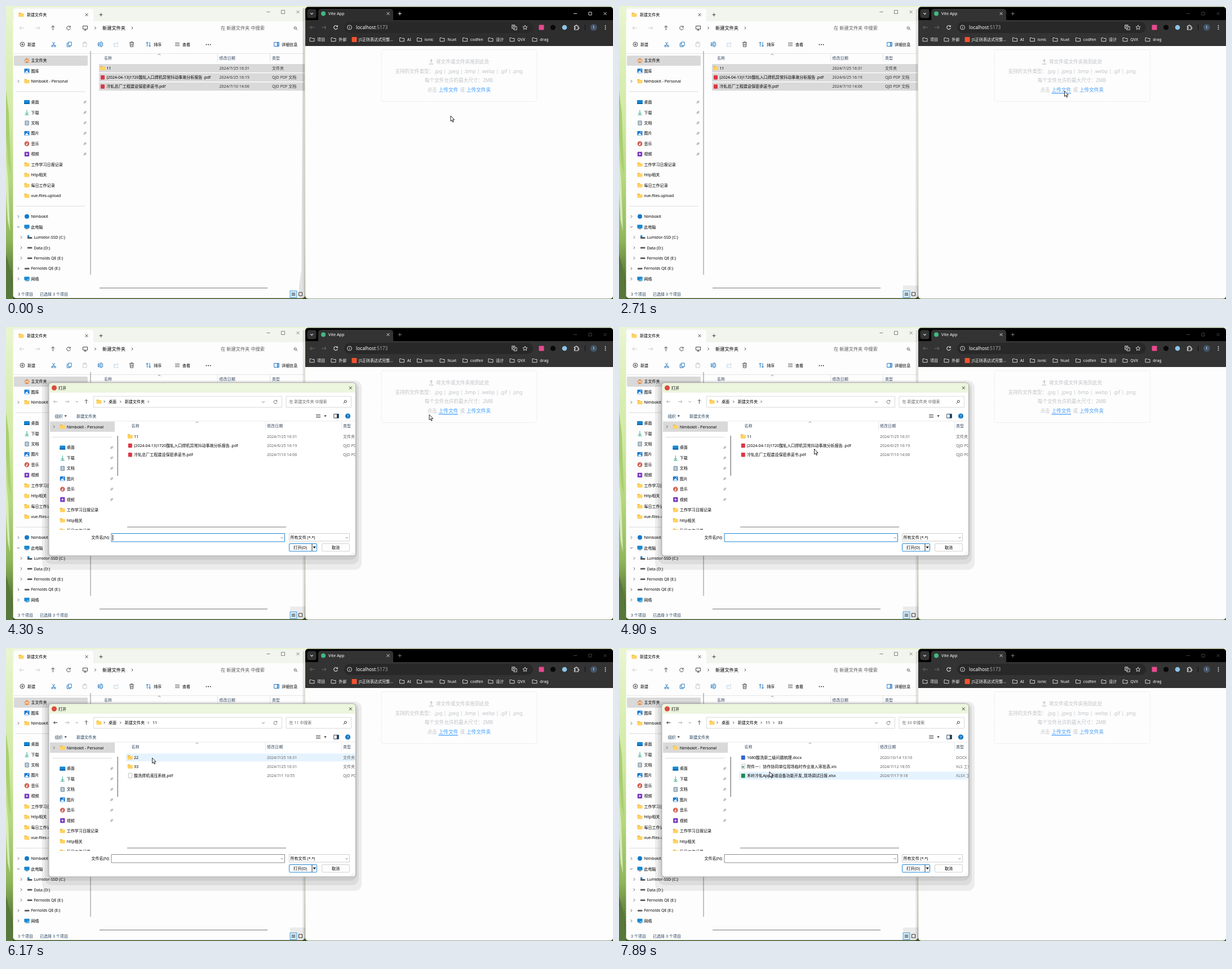
Animation, 1077 px wide and 520 px high, one loop 8 s. Source, as an HTML page with a canvas:

```html
<!DOCTYPE html>
<html lang="zh-CN">
<head>
<meta charset="utf-8">
<title>Upload demo</title>
<style>
html, body { margin: 0; width: 100%; height: 100%; overflow: hidden; background: #fff; }
canvas { display: block; }
</style>
</head>
<body>
<canvas id="stage" width="1077" height="520"></canvas>
<script>
const c = document.getElementById('stage').getContext('2d');
const LOOP = 8000;
const FONT = '"Noto Sans", "Noto Sans CJK SC", "Noto Sans CJK", sans-serif';
const INK = '#000', BLUE = '#0f6cbd', DIM = '#c6c6c6', HEAD = '#3b4c64';

const ring = 'M3.9 0A3.9 3.9 0 1 1-3.9 0 3.9 3.9 0 1 1 3.9 0';
const icons = {
  left: 'M4 0H-4M-1-3L-4 0-1 3', right: 'M-4 0H4M1-3L4 0 1 3', up: 'M0 4V-4M-3-1L0-4 3-1',
  reload: 'M2.8-1.8A3.3 3.3 0 1 0 3.3 .5M3.2-3.8V-1.5H1',
  chevR: 'M-1.2-2.3L1.1 0-1.2 2.3', chevD: 'M-2.3-1.1L0 1.2 2.3-1.1', chevU: 'M-2.3 1L0-1 2.3 1',
  close: 'M-2.5-2.5L2.5 2.5M2.5-2.5L-2.5 2.5', min: 'M-3 0H3', max: 'M-3-3H3V3H-3Z', plus: 'M-3 0H3M0-3V3',
  search: 'M1.2-.6A2 2 0 1 1-2.8-.6 2 2 0 1 1 1.2-.6M.7 .9L3 3',
  screen: 'M-4-3.5H4V2H-4ZM0 2V4M-2 4H2',
  add: ring + 'M-2 0H2M0-2V2', info: ring + 'M0-.4V2M0-2V-1.3',
  cut: 'M-2-4L1.5 2M2-4L-1.5 2M-1 3A1.4 1.4 0 1 1-3.8 3 1.4 1.4 0 1 1-1 3M3.8 3A1.4 1.4 0 1 1 1 3 1.4 1.4 0 1 1 3.8 3',
  copy: 'M-1.5-4H3.8V2.5H-1.5ZM-1.5-2H-4V4.2H1.5V2.5',
  paste: 'M-3.5-3H3V4H-3.5ZM-1.5-4.2H1V-2H-1.5Z',
  rename: 'M0-2.8H-4V2.8H0M2.5-2.8H4V2.8H2.5M1.2-4.2V4.2M0-4.2H2.4M0 4.2H2.4M-2.8 1.6L-1.7-1.4-.6 1.6',
  share: 'M-1-2H-4V4H3V1M-2 1C-2-1 0-2 3-2M1.5-4L3.8-2 1.5 0',
  trash: 'M-4-3H4M-1.5-3V-4.3H1.5V-3M-3-3L-2.4 4.3H2.4L3-3M-1-1V2.5M1-1V2.5',
  sort: 'M-2-4V4M-4-2L-2-4 0-2M2.5-4V4M.5 2L2.5 4 4.5 2',
  lines: 'M-4-2.5H4M-4 0H4M-4 2.5H4',
  panel: 'M-4.3-3.5H4.3V3.5H-4.3ZM1.3-3.5V3.5M2.8-3.5V3.5',
  upload: 'M0 2V-4M-2.6-1.5L0-4 2.6-1.5M-4 4H4',
  folder: 'M-4-3H-1L0-2H4V3.2H-4Z',
  pin: 'M1-3L3-1 1.3 0 .3 2-2-.3 0-1.3ZM-.8 .8L-3 3',
  translate: 'M-4.5-4.5H1V2H-4.5ZM1.5-1.5H4.5V4.5H-1V2M-3.3-2.4H-.3M-1.8-3.4V-2.4M-.8-2.4L-3 .8',
  star: 'M0-4L1.2-1.3 4-1.1 1.9 .8 2.5 3.6 0 2.1-2.5 3.6-1.9 .8-4-1.1-1.2-1.3Z',
  puzzle: 'M-3.5-2.5H-1.2A1.3 1.3 0 1 1 1.2-2.5H3V0A1.2 1.2 0 1 1 3 2V4H-3.5V1.8A1.2 1.2 0 1 0-3.5-.3Z'
};
for (const k in icons) icons[k] = new Path2D(icons[k]);
const arrowPath = new Path2D('M0 0V9.6L2.2 7.5 3.7 11 5.2 10.4 3.7 6.9H6.7Z');
const handPath = new Path2D('M-1 .8Q0-.5 1 .8V4.8L4.4 5.8Q6 6.3 5.7 8L4.7 12.8H-1.6L-4.3 8.4Q-4 6.6-2.6 7.4L-1 8.6Z');

function icon(name, x, y, color = INK, w = 0.9, s = 1) {
  c.save();
  c.translate(x, y);
  c.scale(s, s);
  c.strokeStyle = color;
  c.lineWidth = w / Math.abs(s);
  c.stroke(icons[name]);
  c.restore();
}
function box(x, y, w, h, fill, r = 0, stroke, lw = 1) {
  c.beginPath();
  c.roundRect(x, y, w, h, r);
  if (fill) { c.fillStyle = fill; c.fill(); }
  if (stroke) { c.strokeStyle = stroke; c.lineWidth = lw; c.stroke(); }
}
function dot(x, y, r, fill) {
  c.beginPath();
  c.arc(x, y, r, 0, 7);
  c.fillStyle = fill;
  c.fill();
}
function poly(fill, ...p) {
  c.beginPath();
  for (let i = 0; i < p.length; i += 2) c.lineTo(p[i], p[i + 1]);
  c.fillStyle = fill;
  c.fill();
}
// y is the optical middle of the line
function text(s, x, y, color = INK, size = 7.05, align = 'left') {
  c.font = size + 'px ' + FONT;
  c.textAlign = align;
  c.fillStyle = color;
  c.fillText(s, x, y + size * 0.36);
}
function clipTo(x, y, w, h, draw) {
  c.save();
  c.beginPath();
  c.rect(x, y, w, h);
  c.clip();
  draw();
  c.restore();
}
function folder(x, y) {
  box(x - 4.5, y - 3.6, 4.5, 3, '#e9a920', 0.8);
  box(x - 4.5, y - 2.5, 9, 6.2, '#ffd261', 0.8);
}
function page(x, y) {
  box(x - 3, y - 4.2, 6.2, 8.4, '#fff', 0.5, '#a5a5a5', 0.7);
}

const glyph = {
  folder,
  page,
  pdf: (x, y) => box(x - 3.5, y - 3.5, 7, 7.5, '#dc3545', 1),
  doc: (x, y) => box(x - 3.5, y - 3.5, 7, 7.5, '#3565d0', 1),
  xls: (x, y) => box(x - 3.5, y - 3.5, 7, 7.5, '#1f8a50', 1),
  sheet(x, y) { page(x, y); box(x - 2, y - 1, 3.5, 3.5, '#57a878'); },
  home(x, y) {
    poly('#e8833a', x - 5, y, x, y - 4.5, x + 5, y, x + 3.4, y, x + 3.4, y + 4, x - 3.4, y + 4, x - 3.4, y);
    box(x - 2.3, y - 1, 4.6, 4, '#fff2e4');
    box(x - 0.9, y + 0.5, 1.8, 3.5, '#c96a24');
  },
  pic(x, y) {
    box(x - 4.5, y - 4, 9, 8, '#1878cf', 1);
    poly('#e9f5ff', x - 4, y + 3.5, x - 0.3, y - 1, x + 4, y + 3.5);
    dot(x + 2, y - 1.8, 0.9, '#fff');
  },
  cloud: (x, y) => dot(x, y, 4, '#1479c9'),
  desk(x, y) {
    box(x - 5, y - 3.5, 10, 7, '#1687d0', 1);
    box(x - 5, y + 1.8, 10, 1.7, '#0a5ca6', 0.5);
  },
  down(x, y) {
    icon('up', x, y - 0.6, '#2fa58d', 1, -0.9);
    box(x - 3.5, y + 3.6, 7, 1, '#2fa58d');
  },
  text(x, y) {
    box(x - 3.6, y - 4, 7.4, 8.4, '#7f98ab', 0.8);
    for (let i = 0; i < 3; i++) box(x - 2.2, y - 2.3 + i * 2, 4.6, 1, '#fff');
  },
  music(x, y) {
    dot(x, y, 4.3, '#d0604f');
    box(x, y - 2.4, 0.9, 4, '#fff');
    dot(x - 0.4, y + 1.4, 1.2, '#fff');
  },
  video(x, y) {
    box(x - 4.2, y - 4.2, 8.4, 8.4, '#7b3cc0', 1);
    poly('#fff', x - 1.2, y - 2, x + 2.2, y, x - 1.2, y + 2);
  },
  pc(x, y) {
    box(x - 4.6, y - 3.8, 9.2, 6.2, '#1687d0', 0.8);
    box(x - 2.5, y + 3, 5, 1, '#4a6274');
  },
  disk: (x, y) => box(x - 4, y - 1.2, 8.4, 2.8, '#555a5e', 0.6),
  sysdisk(x, y) {
    box(x - 4, y - 3.6, 3.4, 3.2, '#1e8ad6');
    glyph.disk(x, y + 0.8);
  },
  net(x, y) {
    glyph.pc(x, y);
    dot(x + 2.4, y + 2, 2.3, '#4fb5e6');
  }
};

// label, glyph, arrow, x shift
const quick = [
  ['桌面', 'desk'], ['下载', 'down'], ['文档', 'text'], ['图片', 'pic'], ['音乐', 'music'], ['视频', 'video'],
  ['工作学习日报记录', 'folder'], ['http相关', 'folder'], ['每日工作记录', 'folder'], ['vue-files-upload', 'folder']
];
const tree = [
  ['主文件夹', 'home'], ['图库', 'pic'], ['Nimbokit - Personal', 'folder', 'chevR'], null,
  ...quick, null,
  ['Nimbokit', 'cloud', 'chevR'], ['此电脑', 'pc', 'chevD'], ['Lumidor-SSD (C:)', 'sysdisk', 'chevR', 5],
  ['Data (D:)', 'disk', 'chevR', 5], ['Fernolds QE (E:)', 'disk', 'chevR', 5],
  ['Fernolds QE (E:)', 'disk', 'chevR'], ['网络', 'net', 'chevR']
];
const dialogTree = [['Nimbokit - Personal', 'folder', 'chevR'], null, ...quick];

function drawTree(list, x, y0, lineX, lineW, pinX) {
  list.forEach((row, i) => {
    const y = y0 + i * 18.46;
    if (!row) return box(lineX, y - 0.5, lineW, 1, '#dcdcdc');
    const [label, kind, arrow, dx = 0] = row;
    if (arrow) icon(arrow, x - 15 + dx, y, '#555', 0.9);
    glyph[kind](x + dx, y);
    text(label, x + 7.4 + dx, y);
    const k = quick.indexOf(row);
    if (k >= 0 && k < 6) icon('pin', pinX, y, '#858585', 0.9, 0.8);
  });
}

const PDF = 'QJD PDF 文档', DIR = '文件夹';
const folders = {
  root: [
    ['11', '2024/7/25 16:31', DIR, 'folder'],
    ['(2024-04-13)1720酸轧入口焊机异常抖动事故分析报告 .pdf', '2024/6/25 16:19', PDF, 'pdf'],
    ['冷轧总厂工程建设保密承诺书.pdf', '2024/7/10 14:06', PDF, 'pdf']
  ],
  11: [
    ['22', '2024/7/25 16:31', DIR, 'folder'],
    ['33', '2024/7/25 16:31', DIR, 'folder'],
    ['酸洗焊机液压系统.pdf', '2024/7/1 10:55', PDF, 'pdf']
  ],
  33: [
    ['1680酸洗新二级问题梳理.docx', '2020/10/14 13:16', 'DOCX 文档', 'doc'],
    ['附件一：协作协同单位现场临时作业准入审批表.xls', '2024/7/12 18:55', 'XLS 工作表', 'sheet'],
    ['禾岭冷轧App新增设备功能开发_现场调试日报.xlsx', '2024/7/17 9:18', 'XLSX 工作表', 'xls']
  ]
};

function wallpaper() {
  const g = c.createLinearGradient(0, 0, 0, 520);
  ['#e9f5d0', '#dcefb8', '#cfe8a2', '#b4d67e', '#8fb55a', '#38501f'].forEach((tone, i) =>
    g.addColorStop(i / 5, tone));
  box(0, 0, 1077, 520, g);
  poly('#a9cf70', 0, 150, 5, 190, 9, 300, 4, 280, 0, 230);
  poly('#d8ebba', 0, 270, 4, 310, 7, 400, 3, 380, 0, 330);
  poly('#58773a', 0, 440, 8, 470, 13, 520, 0, 520);
}

function explorer(active) {
  box(12.5, 2, 518, 516.5, '#fdfdfd', 5);
  box(12.5, 2, 518, 25, '#f2f4ee', [5, 5, 0, 0]);
  box(14, 5, 141, 23, '#fdfdfd', [4, 4, 0, 0]);
  folder(27, 15.5);
  text('新建文件夹', 37, 15.5);
  icon('close', 143, 15.5, '#333');
  icon('plus', 168.5, 15.5, '#333');
  icon('min', 465.5, 10.5, '#777');
  icon('max', 491.5, 10.5, '#777');
  icon('close', 518, 10.5, '#777');

  icon('left', 28, 39, DIM);
  icon('right', 56, 39, DIM);
  icon('up', 83.3, 39, '#333');
  icon('reload', 111, 39, '#333');
  icon('screen', 140.5, 39, '#333');
  icon('chevR', 158.5, 39, '#333');
  text('新建文件夹', 171, 39, INK, 8.2);
  icon('chevR', 224, 39, '#333');
  text('在 新建文件夹 中搜索', 381, 39, '#5d5d5d', 8.2);
  icon('search', 514, 39.5, '#444');

  icon('add', 29, 68, '#333');
  text('新建', 38, 68);
  icon('cut', 84.5, 68, BLUE);
  icon('copy', 112.3, 68, BLUE);
  icon('paste', 140, 68, DIM);
  icon('rename', 167.5, 68, BLUE);
  icon('share', 195.5, 68, '#bcd3e4');
  icon('trash', 223, 68, '#444');
  icon('sort', 252.5, 68, BLUE);
  text('排序', 262, 68);
  icon('lines', 304, 68, '#555');
  text('查看', 313, 68);
  for (let i = 0; i < 3; i++) dot(355.5 + i * 3.6, 68.5, 0.9, '#222');
  icon('panel', 480, 68, BLUE);
  text('详细信息', 489, 68);
  box(13, 84, 517, 1, '#e6e6e6');

  box(14, 88, 131, 18, '#d9d9d9', 2);
  drawTree(tree, 37, 96.7, 18, 122, 140);
  box(149.5, 80, 1, 397, '#858585');

  text('名称', 174, 92, HEAD);
  text('修改日期', 378.5, 92, HEAD);
  text('类型', 472, 92, HEAD);
  icon('chevU', 272, 86, '#777', 0.8);
  box(375, 85, 1, 14, '#e2e2e2');
  box(468, 85, 1, 14, '#e2e2e2');
  folders.root.forEach(([name, date, type, kind], i) => {
    const y = 110.4 + i * 16.2;
    box(165, y - 7.4, 365, 14.8, '#d9d9d9');
    glyph[kind](171.5, y);
    text(name, 178.5, y);
    text(date, 378.5, y, '#333');
    text(type, 472, y, '#333');
  });
  box(166, 500, 298, 1, '#777');
  text('3 个项目', 21, 511.5, '#24405c');
  text('已选择 3 个项目', 60, 511.5, '#24405c');
  if (active) {
    box(526.5, 4, 4, 514, 'rgba(0,0,0,.17)');
    poly('rgba(0,0,0,.1)', 526.5, 60, 526.5, 518, 520, 518, 520, 496, 524, 470);
  } else {
    box(526.5, 6, 4.5, 512, 'rgba(0,0,0,.1)');
    box(504, 496, 27, 22, 'rgba(0,0,0,.07)');
  }
  box(504, 505.5, 12, 12, '#d5eaf9', 0, '#3c93cf', 0.9);
  icon('lines', 510, 511.5, '#333', 0.9, 0.8);
  icon('max', 522.5, 511.2, '#333', 1);
}

const marks = [
  [543, '项目'], [581, '外部'], [618, 'JS正则表达式完整...'], [702.5, 'AI'], [733.5, 'ionic'],
  [774, 'Nuxt'], [814.5, 'codfen'], [860, '设计'], [898, 'QVX'], [938, 'drag']
];
function browser(active, underline) {
  const tone = active ? '#2e2e2e' : '#333', ctl = active ? '#eee' : '#4b4b4b', light = '#e4e4e4';
  box(531, 1.5, 546, 518, '#fdfdfd', 5);
  box(531, 1.5, 546, 24, '#000', [5, 5, 0, 0]);
  box(531, 25, 546, 46, tone);
  box(554, 5, 133, 21, tone, [5, 5, 0, 0]);
  box(534.5, 5.5, 16, 16, tone, 4);
  icon('chevD', 542.5, 13.5, light, 1.1);
  dot(563, 13.5, 4, '#41b883');
  text('Vite App', 572, 13.7, '#fff', 7.3);
  icon('close', 678, 13.5, light);
  icon('plus', 698.7, 13.5, active ? light : '#777', 1.1);
  icon('min', 1010, 13.5, ctl);
  icon('max', 1036.5, 13.5, ctl, 0.9, 0.85);
  icon('close', 1063, 13.5, ctl);

  icon('left', 543.5, 38, '#777');
  icon('right', 564, 38, '#777');
  icon('reload', 585, 38, light, 1.1);
  box(600, 28, 335, 20, '#282828', 10);
  icon('info', 609.5, 38, light);
  text('localhost', 621, 38, '#fff', 8.3);
  text(':5173', 621 + c.measureText('localhost').width, 38, '#a8a8a8', 8.3);
  icon('translate', 902, 38, light, 0.9, 0.95);
  icon('star', 921, 38, light);
  box(945.5, 33.5, 9, 9, '#e8498f', 1);
  dot(970.5, 38, 4.6, '#080808');
  dot(991, 38, 4.3, '#8cc5e6');
  icon('puzzle', 1012, 38, light, 1.1);
  box(1027, 33, 1, 10, '#111');
  dot(1042.7, 38, 6, '#44566b');
  text('t', 1042.7, 38, '#fff', 6.5, 'center');
  for (let i = -1; i < 2; i++) dot(1063.5, 38 + i * 3, 0.9, light);

  marks.forEach(([x, label], i) => {
    if (i === 2) box(x - 4.5, 55, 9, 9, '#f1532f', 1);
    else icon('folder', x, 59.5, light, 0.9);
    text(label, x + 9.3 - (i === 2 ? 1.3 : 0), 59.8, '#fff');
  });

  c.setLineDash([2, 1.6]);
  box(666, 77.5, 276, 92, null, 3, '#dcdfe3', 0.8);
  c.setLineDash([]);
  const pale = '#c0c3c8', link = '#409eff', s = 8.6;
  icon('upload', 754.5, 99, '#a9acb2');
  text('将文件或文件夹拖到此处', 763, 99, pale, s);
  text('支持的文件类型：.jpg | .jpeg | .bmp | .webp | .gif | .png', 803.5, 116, pale, s, 'center');
  text('每个文件允许的最大尺寸：2MB', 803.5, 132.3, pale, s, 'center');
  text('点击', 747.5, 149, pale, s);
  text('上传文件', 767.7, 149, link, s);
  text('或', 805.5, 149, pale, s);
  text('上传文件夹', 817, 149, link, s);
  if (underline) box(767.5, 154.3, 34.5 * underline, 1.2, link);
}

function dialog(t, hover) {
  const ready = t >= 3200, dir = t < 6170 ? 'root' : t < 7650 ? '11' : '33';
  [[64, 95, 567, 336], [69, 97, 557, 324], [73, 98, 550, 315]].forEach(([x, y, w, h]) =>
    box(x, y, w, h, 'rgba(0,0,0,.068)', 12));
  box(76, 99, 544.5, 307, '#fff', 5, '#9a9a9a', 0.8);
  box(76.4, 99.4, 543.7, 17, '#ecf5dd', [5, 5, 0, 0]);
  dot(85.5, 108, 4.5, '#dd4b3e');
  text('打开', 93, 108);
  icon('close', 611.3, 108, '#222');
  icon('panel', 586, 158, '#1c3c58');
  box(587.3, 154.5, 3, 7, '#1c3c58');
  dot(606.5, 158, 4.6, '#1479c4');
  text('?', 606.5, 158, '#fff', 7, 'center');
  box(76.5, 166.5, 543.5, 1, '#e9e9e9');

  const off = ready ? 0 : -0.7;
  text('名称', 222.5, 175.8 + off, HEAD);
  text('修改日期', 463, 175.8 + off, HEAD);
  text('类型', 598, 175.8 + off, HEAD);
  icon('chevU', 339, 169, '#777', 0.8);
  box(460, 168, 1, 15, '#e6e6e6');
  box(595, 168, 1, 15, '#e6e6e6');
  const picked = t >= 5900 && t < 6170 ? 0 : t >= 7280 && t < 7650 ? 1 : -1;
  const blank = t < 3320 || (t >= 6170 && t < 6290);
  clipTo(205, 183, 415, 170, () => folders[dir].forEach(([name, date, type, kind], i) => {
    const y = 194.2 + i * 16.1 + off;
    if (i === picked || i === hover) box(213, y - 7, 407, 14, i === picked ? '#cce8ff' : '#e5f3ff');
    glyph[blank && kind === 'pdf' ? 'page' : kind](220.3, y);
    text(name, 227, y);
    text(date, 463, y, '#646464');
    text(type, 598, y, '#646464');
  }));
  box(215, 354.5, 282, 1, '#777');
  if (!ready) return;

  icon('left', 88, 132.5, dir === 'root' ? '#aaa' : '#222', 0.9, 0.85);
  icon('right', 108.5, 132.5, '#aaa', 0.9, 0.85);
  icon('chevD', 125.7, 132.5, '#777', 0.9, 0.8);
  icon('up', 142.5, 132.5, '#444', 0.9, 0.9);
  box(155.5, 123, 334, 19.5, '#fff', 0, '#dadada');
  folder(165, 132.5);
  const crumbs = [[182, '桌面'], [210.7, '新建文件夹'], [260, '11'], [282, '33']];
  const depth = { root: 2, 11: 3, 33: 4 }[dir];
  crumbs.slice(0, depth).forEach(([x, s]) => {
    icon('chevR', x - 7.5, 132.5, '#333', 0.9, 0.8);
    text(s, x, 132.5);
  });
  if (depth === 2) icon('chevR', 252.5, 132.5, '#333', 0.9, 0.8);
  icon('chevD', 456.5, 133, '#666', 0.9);
  icon('reload', 478, 133, '#666', 0.9, 0.9);
  box(497, 123, 115.5, 19.5, '#fff', 0, '#dadada');
  text(`在 ${dir === 'root' ? '新建文件夹' : dir} 中搜索`, 502.5, 132.7, '#666');
  c.save();
  c.translate(601.5, 132.7);
  c.scale(-1, 1);
  icon('search', 0, 0, '#333');
  c.restore();

  text('组织', 86.5, 158, '#1c3c58');
  poly('#333', 103.5, 156.8, 108, 156.8, 105.7, 159.5);
  text('新建文件夹', 125, 158, '#1c3c58');
  icon('lines', 554, 158, '#444');
  poly('#222', 564.3, 156.8, 568.7, 156.8, 566.5, 159.5);

  box(78, 168, 115, 18, '#d9d9d9');
  clipTo(76, 167, 128, 193, () => drawTree(dialogTree, 100.3, 177, 82, 106, 187.5));
  box(197.5, 193, 1.3, 71, '#777');

  const focus = t < 5900;
  text('文件名(N):', 184, 373.7, INK, 7.05, 'right');
  box(187, 366.5, 307.5, 14.5, '#fff', 0, focus ? '#2086d4' : '#8a8a8a');
  icon('chevD', 489.5, 374, '#555', 0.8, 0.8);
  if (focus && Math.floor((t - 3180) / 530) % 2 === 0) box(189.2, 369, 0.9, 10, '#000');
  box(502.5, 366.5, 107, 13.5, '#fff', 0, '#cfcfcf');
  text('所有文件 (*.*)', 504.5, 373.7);
  icon('chevD', 604.5, 374, '#555', 0.8, 0.8);
  box(502.5, 384.5, 49, 13.5, '#fdfdfd', 1.5, '#2086d4');
  text('打开(O)', 522, 391.3, INK, 7.05, 'center');
  box(542.5, 385, 1, 12.5, '#333');
  poly('#111', 544.5, 389.5, 550, 389.5, 547.2, 393);
  box(560.5, 384.5, 49, 13.5, '#fdfdfd', 1.5, '#d2d2d2');
  text('取消', 585, 391.3, INK, 7.05, 'center');
  for (let i = 0; i < 3; i++) dot(617.5 - i * 2, 400 + i * 2, 0.5, '#999');
}

// time, x, y of the pointer tip
const path = [
  [0, 789, 195], [120, 789, 191], [860, 789.7, 159], [1020, 791, 152], [2710, 790.5, 151],
  [4180, 790.5, 151], [4300, 751, 155.5], [4900, 346.5, 216.5], [5020, 292, 207], [5140, 270, 198],
  [5380, 259.5, 195], [6170, 259.5, 195], [6770, 265, 210], [7650, 265, 212], [7890, 267, 219.7], [8000, 267, 219.7]
];
// the pointer is sampled every 120 ms, as a screen recorder does
function pointer(t) {
  let i = path.length - 2;
  while (t < path[i][0]) i--;
  const [t0, x0, y0] = path[i], [t1, x1, y1] = path[i + 1];
  const k = Math.floor((t - t0) / 120) * 120 / (t1 - t0);
  // it rests from the link hover until the list is reached, and between clicks
  const rests = t0 === 860 || t0 === 1020 || t0 === 6770;
  return rests ? [x0, y0] : [x0 + (x1 - x0) * k, y0 + (y1 - y0) * k];
}
function cursor(t, x, y) {
  const shape = t >= 1020 && t < 2710 ? handPath : arrowPath;
  c.save();
  c.translate(x, y);
  c.lineJoin = 'round';
  c.fillStyle = '#fff';
  c.fill(shape);
  c.strokeStyle = '#111';
  c.lineWidth = 0.9;
  c.stroke(shape);
  c.restore();
}

function draw(t) {
  const active = t < 2340;
  const k = Math.min(1, Math.max(0, (t - 1020) / 660));
  const [x, y] = pointer(t);
  wallpaper();
  explorer(active);
  browser(active, k * k * (3 - 2 * k));
  if (t >= 3080) dialog(t, t >= 5140 ? Math.floor((y - 187) / 16.1) : -1);
  cursor(t, x, y);
}

const start = performance.now();
(function tick() {
  draw((performance.now() - start) % LOOP);
  requestAnimationFrame(tick);
})();
</script>
</body>
</html>
```
